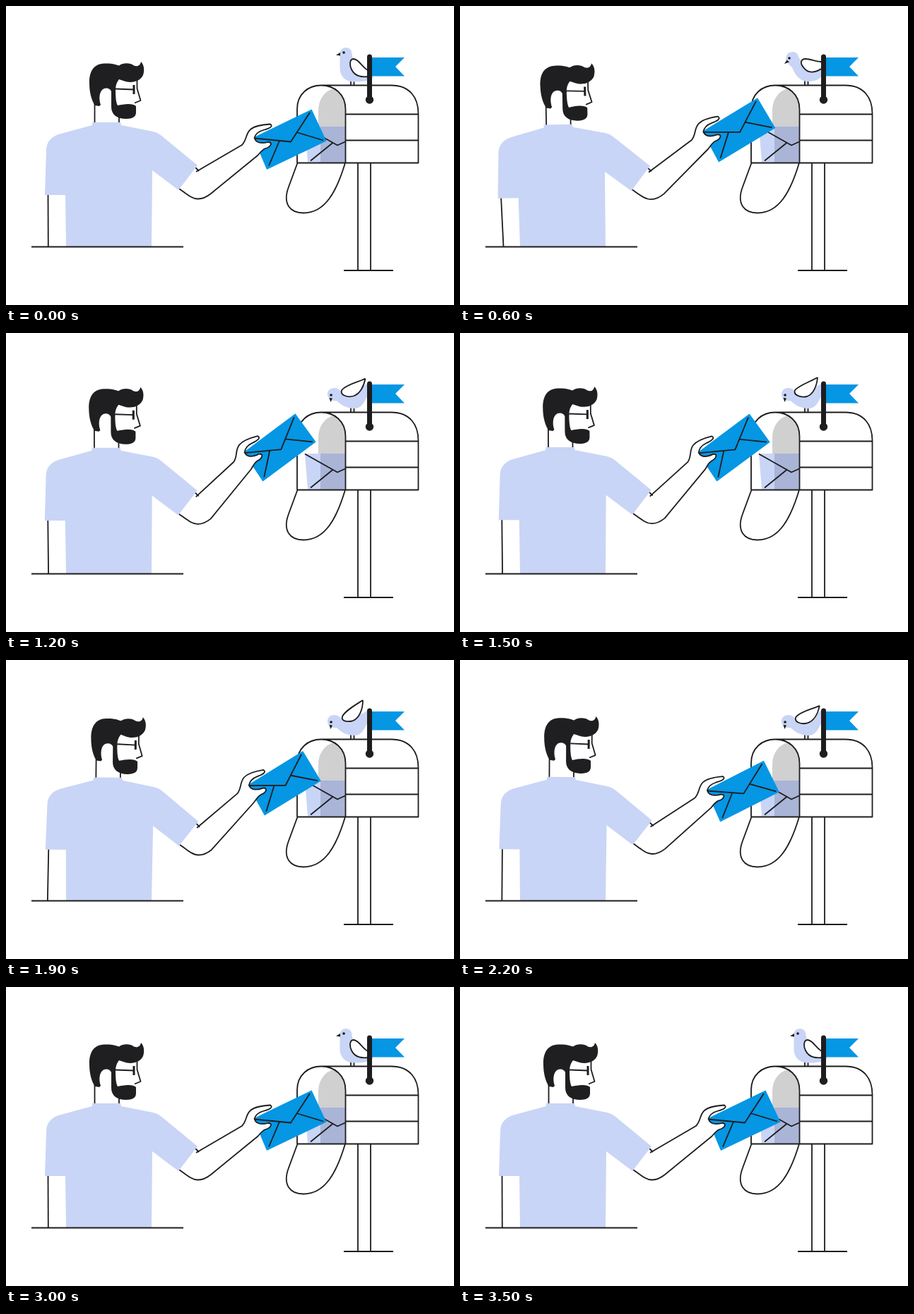
Animation of 634 by 424 pixels, one loop 3600 ms. Source, as an HTML page:

```html
<!DOCTYPE html>
<html lang="en">
<head>
<meta charset="utf-8">
<title>Posting a letter</title>
<style>
  html, body { margin: 0; width: 100%; height: 100%; overflow: hidden; background: #fff; }
  svg { display: block; }
  .line { fill: none; stroke: #1d1d1f; stroke-width: 1.8; stroke-linejoin: round; }
  .round { stroke-linecap: round; }
  .white { fill: #fff; }
  .ink { fill: #1f1f21; }
  .blue { fill: #0596e4; }
  .pale { fill: #c9d5f6; }
</style>
</head>
<body>
<svg width="634" height="424" viewBox="0 0 634 424">
  <!-- mailbox -->
  <path class="line" d="M478 375H548M498 222V375M516 222V375"/>
  <g transform="translate(0 .5)">
    <path fill="#d0d0d0" d="M480.5 222V146C480.5 133 474 122 464 116C450 121 442 132 442 148V222Z"/>
    <path class="pale" d="M423 170.5H446V221H427Z"/>
    <path fill="#a9b4d7" d="M445 170.5H480.5V221H445Z"/>
    <path class="line" d="M423 171L469 197L480 192M431 219L463 193"/>
    <path class="line" d="M412 222V146C412 124 428 112 446 112S480.5 124 480.5 146V222
      M446 112H545C572 112 583.5 130 583.5 152V222H412M481 153H583M481 190H583
      M412.5 222L400 256C391 280 402 293 421 293C452 293 468 262 480 222"/>
  </g>

  <!-- bird and flag -->
  <path class="line" d="M488 105V112M492.5 105V112"/>
  <path id="bird" class="pale"/>
  <path id="wing" class="line white"/>
  <path id="beak" class="ink"/>
  <path id="eye" class="line round" style="stroke-width:3.6"/>
  <path class="blue" d="M518 73H564L551 86L564 99.5H518Z"/>
  <path class="line round" style="stroke-width:7" d="M514.5 72V133"/>
  <circle class="ink" cx="514.5" cy="133" r="5.7"/>

  <!-- man -->
  <path id="letter" class="blue"/>
  <path id="folds" class="line"/>
  <path id="arm" class="line white"/>
  <path id="cuff" class="line"/>
  <path id="sideArm" class="line"/>
  <g id="head">
    <path class="line" d="M125.5 136V172M160 155V172M185.5 104V117L190.5 134L182 137.5"/>
    <path class="ink" d="M126 141C121 134 118 122 118 110C117.5 93 124 82 139 81.5C150 81 155 83 160 84.5
      C166 80 176 80.5 181 84.5C186 86.5 190 84.5 191 79C196 84 196 92 194 98C189 108 176 110 166 106L160 104
      C157 108 155 112 155 120L149 121C147 116 140 115 136 119C131 124 132 135 134 140L132 142Z"/>
    <path class="ink" d="M149 117H155C155 128 155.5 137 158 141C163 140 168 139 173 139C178 139 182 140 184 142
      V151C184 157 179 160 170 160C157 160 149 154 149 143Z"/>
    <path class="line" d="M155 117.5L181 118.5"/>
    <path class="line" style="stroke-width:3" d="M181 112V125"/>
  </g>
  <path id="shirt" class="pale"/>
  <path class="line" d="M36 341.5H251"/>
</svg>
<script>
const LOOP = 3600, STEP = 100;

// Bird poses: upright, leaning, bowed; the wing goes on to rise in two more.
const BIRD = [
  'M472.5 68C472.5 56 489.5 56 489.5 68C491 82 505 94 520 98L519 102C510 108 500 107.5 492 107.5C480 107.5 472.5 99 472.5 88C472.5 82 472.5 74 472.5 68Z',
  'M461.5 74C461.5 62.5 478 62.5 479 72C482 80 496 84 512 88L513 99C508 105 500 107 491 107C482 107 474 98 470 87C464 82 461.5 79 461.5 74Z',
  'M455 87C455 76 469 76 473 82C484 84 500 80 514 70L514 84C508 96 504 107 493 107C481 107 473 101 468 96C462 97 455 94 455 87Z'
];
const WING = [
  'M512 91C503 86 500 76 492 75C486 75 486 84 489 90C494 100 503 101 513 100',
  'M511 79C503 79 496 75 489 75C482 75 481 82 486 87C492 96 503 95 511 89',
  'M511 66C503 70 485 71 477 80C472 87 482 92 492 89C502 86 508 76 511 66',
  'M506 63C498 68 480 74 474 81C471 88 482 92 491 90C500 87 505 75 506 63',
  'M505 57C494 64 480 72 476 80C474 87 482 88 490 86.5C500 83 505 70 505 57'
];
const BEAK = ['M467 69.5L473 66L473 70.5Z', 'M459 82L462.5 76.5L466 79.5Z', 'M459.5 98L457.5 92L462 92.5Z'];
const EYE = ['M478 66h.1', 'M466 74h.1', 'M460 88h.1'];

const $ = id => document.getElementById(id);
const draw = (id, d) => $(id).setAttribute('d', d);
const smooth = x => x * x * (3 - 2 * x);
const linear = x => x;

// Value at time t from [time, value] pairs.
function track(t, keys, ease = smooth) {
  const i = keys.findIndex(k => k[0] > t);
  if (i < 0) return keys[keys.length - 1][1];
  if (i === 0) return keys[0][1];
  const [t0, a] = keys[i - 1], [t1, b] = keys[i];
  return a + (b - a) * ease((t - t0) / (t1 - t0));
}

// Blend neighbouring paths of the same structure.
function morph(poses, q) {
  q = Math.min(q, poses.length - 1);
  const i = Math.min(Math.floor(q), poses.length - 2), f = q - i;
  const number = /\d*\.?\d+/g, next = poses[i + 1].match(number);
  let n = 0;
  return poses[i].replace(number, v => (+v + (next[n++] - v) * f).toFixed(2));
}

function drawBird(t) {
  const q = track(t, [[250, 0], [600, 1], [900, 2], [1500, 3], [1900, 4], [2600, .35], [2900, 0]], linear);
  draw('bird', morph(BIRD, q));
  draw('wing', morph(WING, q));
  draw('beak', morph(BEAK, q));
  draw('eye', morph(EYE, q));
}

function drawMan(t) {
  const lean = track(t, [[0, 0], [600, -.019], [900, -.003], [1500, -.003], [1900, .0105], [2500, 0]]);
  const dy = track(t, [[0, 0], [600, 3], [900, -1.5], [1500, -3], [1900, 1.7], [2500, 0]]);
  const lift = track(t, [[150, 0], [1050, 1], [1450, 1], [2400, 0]]);
  const angle = -11 * lift * Math.PI / 180, cos = Math.cos(angle), sin = Math.sin(angle);

  // s: point leaning about the waist with the torso, h: point moving with the hand
  const s = (x, y) => `${x + lean * (341 - y)} ${y + lean * (x - 150) + dy} `;
  const h = (x, y) => {
    const u = x - 401.5, v = y - 188.5;
    return `${401.5 - 14.5 * lift + u * cos - v * sin} ${188.5 - 27 * lift + u * sin + v * cos} `;
  };

  draw('letter', `M${h(350, 186.5)}L${h(432.5, 146.5)}L${h(453.5, 191.5)}L${h(369, 232)}Z`);
  draw('folds', `M${h(351, 187.5)}L${h(403, 192.5)}L${h(430, 151)}M${h(411, 179)}L${h(449, 190.5)}M${h(387, 191)}L${h(372, 226.5)}`);
  draw('arm', `M${s(269, 235)}L${h(334, 197)}C${h(341, 190)}${h(339, 181)}${h(346, 175)}` +
    `C${h(353, 169)}${h(365, 168)}${h(374, 167.5)}C${h(379, 171)}${h(372, 174)}${h(364, 176)}` +
    `C${h(357, 178)}${h(353, 182)}${h(351.5, 187)}C${h(354, 195)}${h(363, 195)}${h(371, 193)}` +
    `C${h(378, 193)}${h(375, 200)}${h(367, 202)}C${h(362, 204)}${h(359, 209)}${h(356, 212)}` +
    `L${s(290, 266)}C${s(285, 270)}${s(280, 273.5)}${s(272, 273.5)}C${s(264, 274)}${s(256, 267)}${s(245, 259)}`);
  draw('cuff', `M${s(267, 228)}L${s(273, 234)}`);
  draw('sideArm', `M${s(59.5, 266)}L${59.8 - lean * 90} 341`);
  draw('shirt', `M${s(122, 165)}L${s(162, 165)}L${s(163, 169)}L${s(208, 178)}C${s(216, 180)}${s(219, 183)}${s(225, 188)}` +
    `L${s(271, 226)}L${s(244, 261)}L${s(207, 233)}L206 341H85L${s(84, 268)}L${s(55, 268)}L${s(57, 205)}` +
    `C${s(57, 191)}${s(66, 184)}${s(78, 181)}L${s(122, 169)}Z`);
  $('head').setAttribute('transform', `translate(0 ${dy}) rotate(${lean * 180 / Math.PI} 150 341)`);
}

function frame(now) {
  const t = Math.floor(now % LOOP / STEP) * STEP;
  drawBird(t);
  drawMan(t);
  requestAnimationFrame(frame);
}
frame(performance.now());
</script>
</body>
</html>
```
